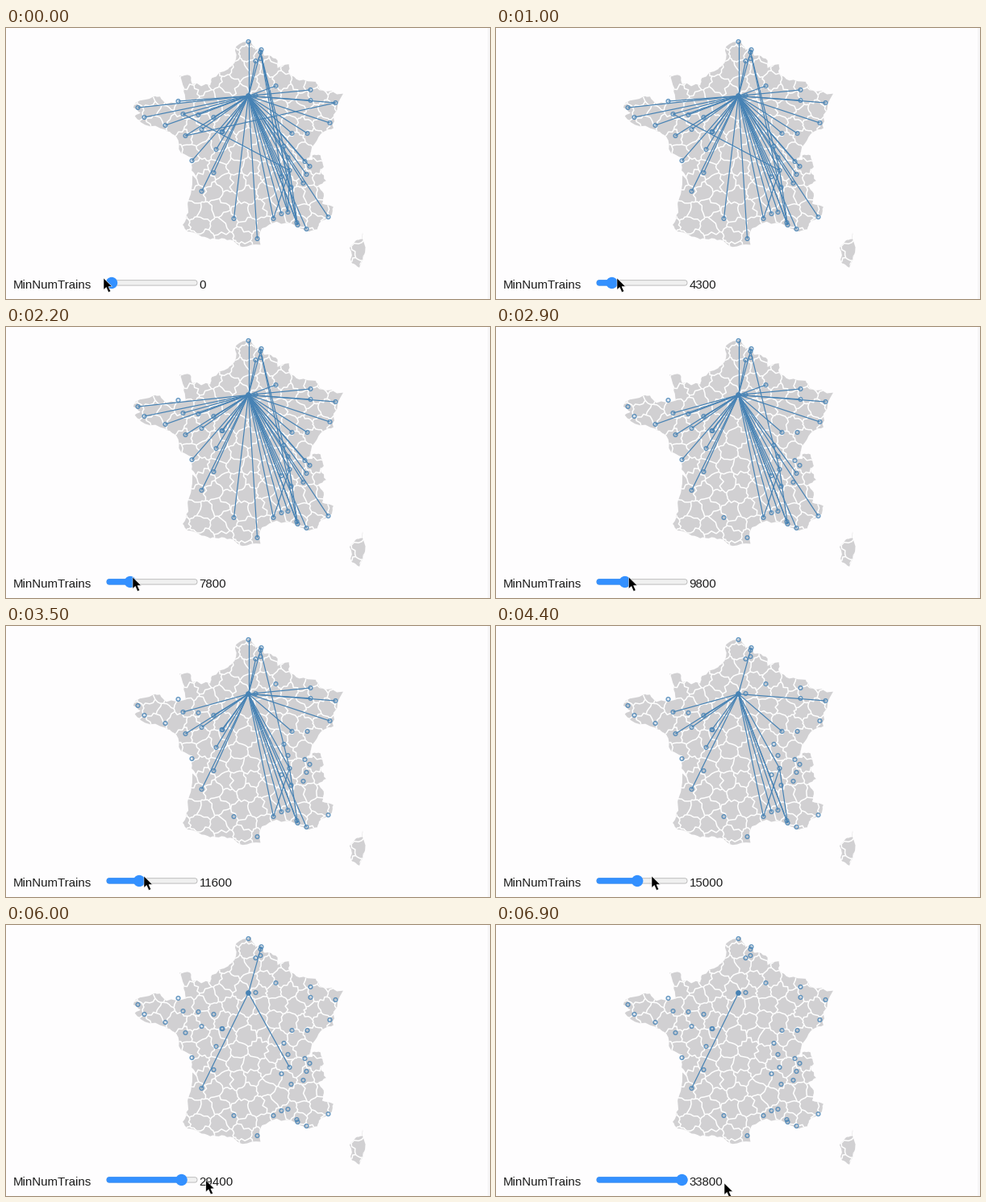
These frames come from a looping animation (600 px wide and 337 px high, 7000 ms). A matplotlib script:

```python
import numpy as np
import matplotlib.pyplot as plt
from matplotlib.animation import FuncAnimation
from matplotlib.collections import LineCollection
from matplotlib.patches import Circle, FancyBboxPatch, PathPatch, Polygon, Rectangle
from matplotlib.path import Path
from matplotlib.tri import Triangulation

W, H, DPI = 600, 337, 64
PT = 72 / DPI                      # points per pixel
STEP, FRAMES = 100, 70
BLUE, ACCENT = "#4682b4", "#3390ff"
LAND, PAGE = "#d1d0d2", "#fefdfe"
TRACK_Y, KNOB_START, KNOB_TRAVEL, MAX_VALUE = 317, 131, 99.5, 33800
rng = np.random.default_rng(7)

# Corner points of the outlines as lon, lat, clockwise
MAINLAND = [
    (2.5, 51.1), (2.8, 50.7), (3.1, 50.8), (3.3, 50.5), (3.6, 50.5), (4.15, 50.3),
    (4.15, 50), (4.85, 50.15), (4.85, 49.8), (5.5, 49.5), (6.5, 49.45),
    (6.75, 49.15), (8.2, 48.97), (7.6, 48.1), (7.6, 47.55), (7, 47.4),
    (6.45, 46.9), (6, 46.2), (6.3, 46.2), (6.3, 46.4), (6.8, 46.4), (7, 45.9),
    (6.8, 45.75), (7.15, 45.3), (6.65, 45.1), (7, 44.75), (6.9, 44.3),
    (7.6, 44.15), (7.5, 43.8), (6.7, 43.4), (6.6, 43.15), (6.1, 43.05),
    (5.3, 43.3), (4.1, 43.5), (3.2, 43.2), (3.05, 43), (3.1, 42.45), (2, 42.35),
    (1.4, 42.65), (0.7, 42.75), (0, 42.7), (-0.7, 42.9), (-1.4, 43.05),
    (-1.7, 43.35), (-1.35, 43.9), (-1.1, 45.55), (-0.75, 45.3), (-1.15, 45.75),
    (-1.1, 46.3), (-1.8, 46.5), (-2.1, 47.2), (-2.5, 47.4), (-3.1, 47.55),
    (-4.3, 47.8), (-4.65, 48.05), (-4.3, 48.2), (-4.75, 48.4), (-4.6, 48.6),
    (-3.5, 48.85), (-3.1, 48.85), (-2.7, 48.55), (-1.5, 48.65), (-1.6, 49.2),
    (-1.9, 49.7), (-1.25, 49.7), (-1.1, 49.35), (0, 49.3), (0.1, 49.6),
    (1.1, 49.95), (1.5, 50.2), (1.6, 50.85)]
CORSICA = [(9.4, 43), (9.55, 42.1), (9.2, 41.4), (8.75, 41.6), (8.6, 42.3),
           (9, 42.65), (9.35, 42.7)]

# Stations linked to the hub, from the fewest trains to the most
HUB = (300.5, 84.5)
STATIONS = [
    (213, 91), (373, 131), (370, 166), (171, 111), (376, 172), (311, 262),
    (163, 99), (368, 193), (282, 237), (399, 235), (197, 121), (341, 185),
    (372, 182), (230, 165), (334, 72), (238, 108), (257, 180), (353, 198),
    (401, 118), (377, 77), (300, 17), (372, 250), (309, 41), (377, 90),
    (268, 129), (257, 111), (267, 129), (361, 245), (341, 231), (242, 126),
    (354, 131), (331, 237), (360, 242), (219, 107), (349, 229), (222, 134),
    (260, 151), (408, 93), (351, 177), (316, 27), (242, 203)]
OTHER_STATIONS = [(315, 30), (315, 38), (344, 147), (349, 161), (309, 84)]
LYON, LILLE, MARSEILLE, AVIGNON = (351, 177), (315, 30), (361, 245), (349, 229)
# Lines that avoid the hub, again from the fewest trains to the most
CROSS_LINES = [
    (LILLE, (360, 242)), (LILLE, AVIGNON), (LYON, AVIGNON),
    ((222, 134), (408, 93)), ((219, 107), LYON), (LILLE, MARSEILLE),
    (LILLE, LYON), (LYON, (331, 237)), (LYON, MARSEILLE)]

# Time in ms, slider value, pointer x
DRAG = np.array([
    (0, 0, 121), (200, 0, 134), (1000, 4300, 150), (2200, 7800, 157),
    (3500, 11600, 171), (4400, 15000, 193), (5300, 21700, 209),
    (6400, MAX_VALUE, 270), (6900, MAX_VALUE, 283)])
ARROW = np.array([(0, 0), (0, 14.5), (3.3, 11.5), (6, 17.6), (8.7, 16.4),
                  (6, 10.6), (10.5, 10.4)])


def mercator(points):
    lon, lat = np.radians(points).T
    y = np.log(np.tan(np.pi / 4 + lat / 2))
    return np.column_stack([253.2 + 1151 * lon, 85 - 1151 * (y - 0.9801)])


def wiggle(p, q, amount, parts=4):
    """Points from p to q, pushed sideways at random between the ends."""
    t = np.linspace(0, 1, parts + 1)[:, None]
    side = np.array([p[1] - q[1], q[0] - p[0]])
    push = rng.uniform(-amount, amount, (parts + 1, 1))
    push[[0, -1]] = 0
    return p + (q - p) * t + side * push


def outline(points):
    xy = mercator(points)
    ring = np.vstack([wiggle(p, q, 0.08)[:-1] for p, q in zip(xy, np.roll(xy, -1, 0))])
    return Path(np.vstack([ring, ring[:1]]), closed=True)


def department_borders(size=20):
    """Voronoi edges of a jittered honeycomb."""
    rows = np.arange(-20, 340, size * 0.88)
    cells = [(x + size / 2 * (i % 2), y)
             for i, y in enumerate(rows) for x in np.arange(130, 480, size)]
    pts = np.array(cells) + rng.uniform(-5.5, 5.5, (len(cells), 2))
    tri = Triangulation(pts[:, 0], pts[:, 1])
    p, q, r = (pts[tri.triangles[:, k]] for k in range(3))
    b, c = q - p, r - p
    d = 2 * (b[:, 0] * c[:, 1] - b[:, 1] * c[:, 0])
    bb, cc = (b ** 2).sum(1), (c ** 2).sum(1)
    centres = p + np.column_stack([(c[:, 1] * bb - b[:, 1] * cc) / d,
                                   (b[:, 0] * cc - c[:, 0] * bb) / d])
    return [wiggle(centres[i], centres[j], 0.16)
            for i, row in enumerate(tri.neighbors) for j in row if j > i]


def bar(x0, x1, face, edge):
    """Rounded slider bar, 7 pixels high."""
    box = FancyBboxPatch((x0 + 3, TRACK_Y - 0.3), x1 - x0 - 6, 0.4, fc=face, ec=edge,
                         lw=0.9 * PT, zorder=5,
                         boxstyle="round,pad=3,rounding_size=3.2")
    return ax.add_patch(box)


def label(x, text):
    return ax.text(x, 324.3, text, family="Liberation Sans", size=15 * PT,
                   color="#1c1c1c", va="baseline", zorder=6)


fig = plt.figure(figsize=(W / DPI, H / DPI), dpi=DPI, facecolor=PAGE)
ax = fig.add_axes([0, 0, 1, 1])
ax.set(xlim=(0, W), ylim=(H, 0))
ax.axis("off")
ax.add_patch(Rectangle((596.5, 0), 4, H, fc="#f7f6f7", ec="none"))

land = Path.make_compound_path(outline(MAINLAND), outline(CORSICA))
ax.add_patch(PathPatch(land, fc=LAND, ec="none", zorder=1))
borders = LineCollection(department_borders(), colors="white",
                         linewidths=1.5 * PT, zorder=2)
ax.add_collection(borders, autolim=False)
borders.set_clip_path(land, ax.transData)

for x, y in STATIONS + OTHER_STATIONS:
    ax.add_patch(Circle((x + 0.5, y), 2.4, fc=(0.27, 0.51, 0.71, 0.15),
                        ec=(0.27, 0.51, 0.71, 0.8), lw=1.4 * PT, zorder=3))
ax.add_patch(Circle(HUB, 3.4, fc=BLUE, ec="none", zorder=3))

# Train counts grow with a line's rank
segments = np.array([(HUB, (x + 0.5, y)) for x, y in STATIONS]
                    + [np.add(pair, (0.5, 0)) for pair in CROSS_LINES])
counts = np.concatenate([
    np.interp(np.arange(len(STATIONS)), [0, 1, 16, 25, 33, 40],
              [6500, 8000, 11700, 15100, 21800, 34000]),
    np.geomspace(1400, 27500, len(CROSS_LINES))])
lines = LineCollection([], colors=BLUE, linewidths=1.2 * PT, zorder=4)
ax.add_collection(lines, autolim=False)

label(8.5, "MinNumTrains")
number = label(239.5, "0")
bar(125, 237, "#f0f0f0", "#b9b9b9")
filled = bar(125, KNOB_START, ACCENT, ACCENT)
knob = ax.add_patch(Circle((KNOB_START, TRACK_Y), 7.2, fc=ACCENT, ec="none", zorder=6))
pointer = ax.add_patch(Polygon(ARROW, fc="black", ec="white", lw=0.5 * PT, zorder=9))


def update(frame):
    ms = frame * STEP
    times, values, tips = DRAG.T
    value = int(round(np.interp(ms, times, values) / 100)) * 100
    tip_y = 311 + 10 * np.clip((ms - 5300) / 1100, 0, 1)

    lines.set_segments(segments[counts >= value])
    x = KNOB_START + KNOB_TRAVEL * value / MAX_VALUE
    knob.center = x, TRACK_Y
    filled.set_width(x - KNOB_START)
    number.set_text(str(value))
    pointer.set_xy(ARROW + (np.interp(ms, times, tips), tip_y))
    return lines, knob, filled, number, pointer


anim = FuncAnimation(fig, update, frames=FRAMES, interval=STEP, repeat=True,
                     repeat_delay=0, blit=False)
plt.show()
```
